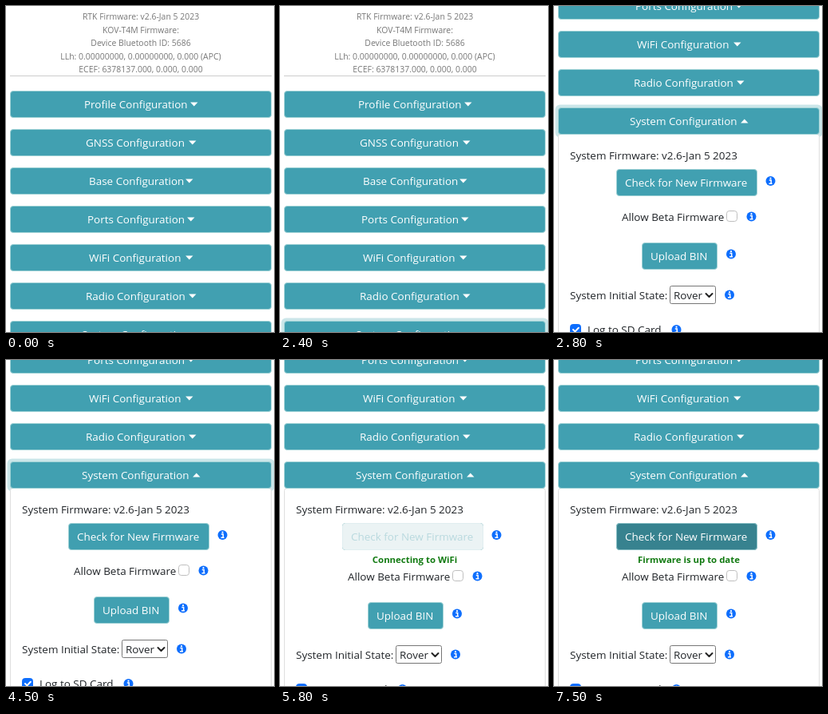
Recreate the animation shown at these times as an HTML page. Size 336x408 px, loop 8000 ms.

```html
<!DOCTYPE html>
<html lang="en">
<head>
<meta charset="utf-8">
<title>Device configuration</title>
<style>
html, body { margin: 0; width: 100%; height: 100%; overflow: hidden; background: #fff; }
svg { display: block; }
text { font: 13.46px "Open Sans", "Noto Sans", sans-serif; fill: #212529; white-space: pre; }
.head text { font-size: 10.45px; fill: #777; text-anchor: middle; }
.btn rect { fill: #41a0b1; stroke: #9bd0d4; }
.btn text { font-weight: 500; }
.btn text, .btn path { fill: #fff; }
.dark rect { fill: #37828f; stroke: #86bdc3; }
.off rect { fill: #ebf3f4; stroke: #e0eef0; }
.off text { fill: #b9d9de; }
.box { fill: #fff; stroke: #bfbfbf; }
.checked { fill: #0d6efd; stroke: #0d6efd; }
.line { fill: none; stroke: #fff; stroke-width: 2; stroke-linecap: round; stroke-linejoin: round; }
#status { font-size: 11.4px; font-weight: 700; fill: #117a11; text-anchor: middle; }
</style>
</head>
<body>
<svg id="stage" width="336" height="408" viewBox="0 0 336 408"></svg>
<script>
const LOOP = 8000, NOTCH = 89;
const $ = id => document.getElementById(id);

const label = (x, y, s) => `<text x="${x}" y="${y}">${s}</text>`;
const rect = (x, y, w, h, r, attrs = '') =>
  `<rect x="${x}" y="${y}" width="${w}" height="${h}" rx="${r}" ${attrs}/>`;
const button = (x, y, w, tx, s, extra = '', attrs = 'class="btn"') =>
  `<g ${attrs}>${rect(x + .5, y + .5, w - 1, 33, 3.5)}${label(tx, y + 22, s)}${extra}</g>`;
const caret = (x, y, up) => up
  ? `<path d="M${x - 4.7} ${y + 5}h9.4l-4.7 -5z"/>`
  : `<path d="M${x - 4.7} ${y}h9.4l-4.7 5z"/>`;
const info = (x, y) =>
  `<circle cx="${x}" cy="${y}" r="6" fill="#0d6efd"/>
   <path d="M${x - 1.7} ${y - .9}h2.4v4M${x - 2} ${y + 3.2}h4" fill="none" stroke="#fff" stroke-width="1.5"/>
   <circle cx="${x}" cy="${y - 3.3}" r="1.1" fill="#fff"/>`;

const header = ['RTK Firmware: v2.6-Jan 5 2023', 'KOV-T4M Firmware:',
  'Device Bluetooth ID: 5686', 'LLh: 0.00000000, 0.00000000, 0.000 (APC)',
  'ECEF: 6378137.000, 0.000, 0.000'];
const sections = [['Profile', 98], ['GNSS', 100], ['Base', 104], ['Ports', 102],
  ['WiFi', 104], ['Radio', 100], ['System', 95]];

const bars = sections.map(([name, x], i) => {
  const y = 106 + 48 * i;
  return button(5, y, 328, x, name + ' Configuration',
    caret(333.8 - x, y + 14.5, name === 'System'));
}).join('');

// The System panel is laid out as seen once fully scrolled, 267px down.
const check = (id, cls) =>
  button(78, 204, 177, 89, 'Check for New Firmware', '', `id="${id}" class="btn ${cls}"`);

$('stage').innerHTML = `<g id="page">
  <g class="head">${header.map((s, i) => label(169, 17 + 16.5 * i, s)).join('')}</g>
  <path d="M5 87.5h328" stroke="#ccc"/>
  ${rect(1.5, 390.5, 335, 41, 6, 'id="ring" fill="#cbe6e9"')}
  ${rect(5.5, 427.5, 327, 400, 3, 'fill="#fff" stroke="#dfdfdf"')}
  ${bars}
  <g transform="translate(0 267)">
    ${label(20, 192, 'System Firmware: v2.6-Jan 5 2023')}
    ${check('normal', '')}${check('hover', 'dark')}${check('disabled', 'off')}
    ${info(271.5, 219)}
    <text id="status" x="169" y="254"></text>
    <g id="rest">
      ${label(85, 269, 'Allow Beta Firmware')}
      ${rect(216.5, 256.5, 13, 13, 3.2, 'class="box"')}${info(247.5, 263.5)}
      ${button(110, 296, 95, 121, 'Upload BIN')}${info(222, 310.5)}
      ${label(20, 367, 'System Initial State:')}
      ${rect(145.5, 350.5, 57, 22, 2, 'fill="#fff" stroke="#767676"')}
      ${label(150, 367, 'Rover')}
      <path d="M190.5 360l4 4l4-4" class="line" style="stroke:#222"/>${info(220, 361.5)}
      ${rect(20.5, 398.5, 13, 13, 3.2, 'class="checked"')}
      <path d="M24 405l2.4 2.4l4.4-4.6" class="line"/>
      ${label(42, 410, 'Log to SD Card')}${info(153.5, 405)}
    </g>
  </g>
</g>`;

const ramp = (t, start, span = 150) => Math.min(1, Math.max(0, (t - start) / span));

function draw(t) {
  const clicked = t >= 4800, done = t >= 6700;
  const notches = Math.min(3, Math.max(0, Math.floor((t - 2500) / 100)));
  $('page').setAttribute('transform', `translate(0 ${-NOTCH * notches})`);
  $('ring').setAttribute('opacity', ramp(t, 1400) - ramp(t, 4800));
  $('hover').setAttribute('opacity', ramp(t, 4500));
  $('disabled').setAttribute('opacity', ramp(t, 4800) - ramp(t, 6700));
  $('rest').setAttribute('transform', `translate(0 ${clicked ? 7 : 0})`);
  $('status').textContent = done ? 'Firmware is up to date' : clicked ? 'Connecting to WiFi' : '';
}

function tick() {
  draw(performance.now() % LOOP);
  requestAnimationFrame(tick);
}
tick();
</script>
</body>
</html>
```
